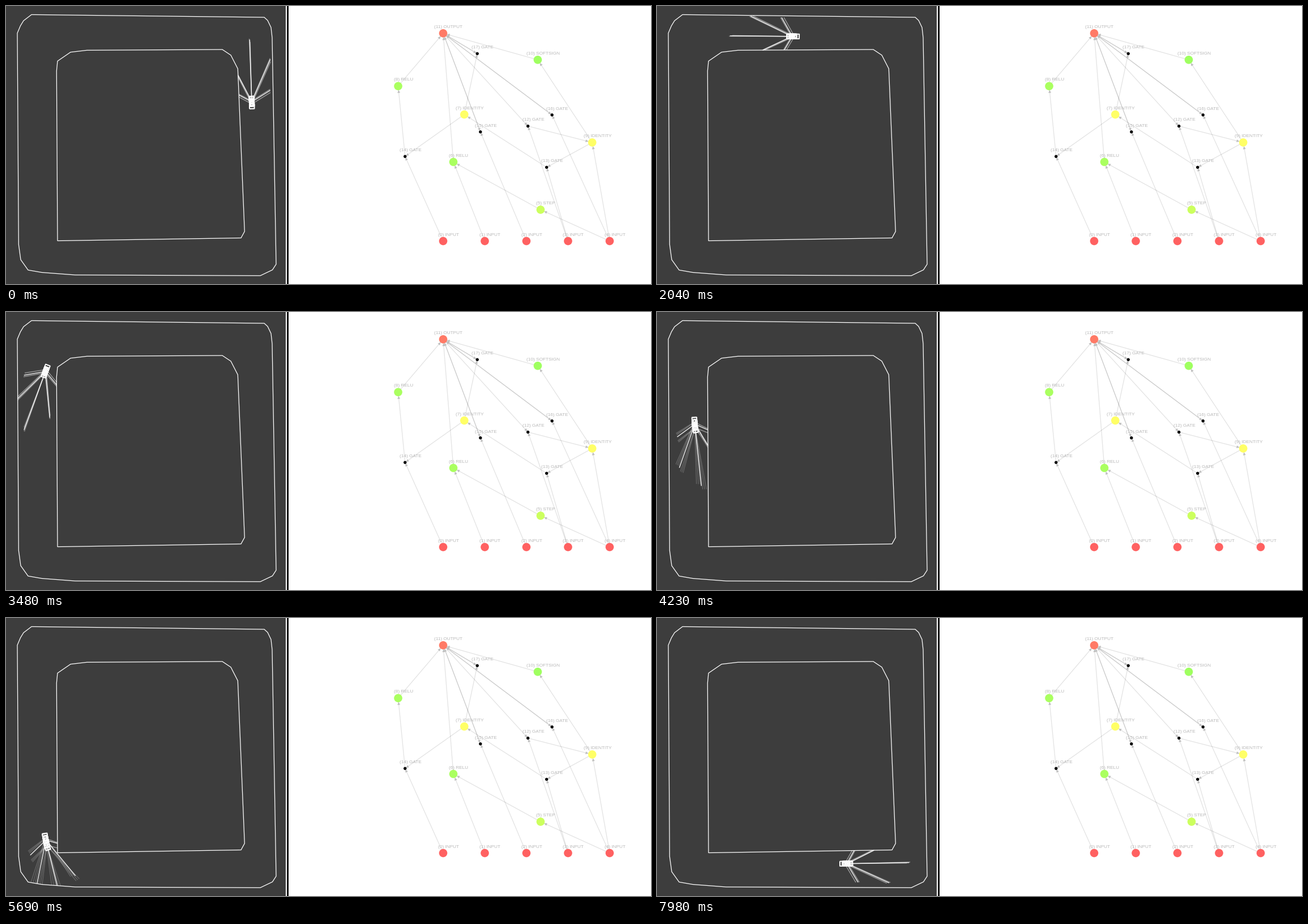
Animation, 1139 px wide and 492 px high, one loop 8 s. Source, as a matplotlib script:

```python
import numpy as np
import matplotlib.pyplot as plt
from matplotlib.animation import FuncAnimation
from matplotlib.collections import LineCollection
from matplotlib.patches import Circle, Polygon, Rectangle

W, H, DPI = 1139, 492, 64
PX = 72 / DPI            # points per pixel
STEP_MS, LOOP_MS = 40, 8000
SPEED = 0.132            # pixels per ms
FOLLOWERS = 6

fig = plt.figure(figsize=(W / DPI, H / DPI), dpi=DPI, facecolor="white")
ax = fig.add_axes([0, 0, 1, 1])
ax.set_xlim(0, W)
ax.set_ylim(H, 0)
ax.axis("off")


def unit(angle):
    return np.stack([np.cos(angle), np.sin(angle)], axis=-1)


# ---------- track ----------
OUTER = np.array([
    (45, 15.3), (456, 20), (462, 25.5), (468, 38), (470, 56), (477, 457),
    (470.5, 467), (449, 477.3), (122, 476), (63, 471.5), (39, 467.3),
    (26, 449), (22.3, 422), (20, 48), (25.5, 35), (31, 26)])
INNER = np.array([
    (143, 78.3), (382, 77), (397, 87), (409.3, 111), (421.3, 399),
    (415, 410.5), (91, 415.5), (89.3, 115), (91, 97.5), (114, 81.7)])

ax.add_patch(Rectangle((0, 0), 494, H, color="#3d3d3d", lw=0))
ax.add_patch(Rectangle((496, 0), 3, H, color="black", lw=0))
for wall in (OUTER, INNER):
    ax.add_patch(Polygon(wall, fill=False, ec="white", lw=1.25 * PX))

WALL_A = np.vstack([OUTER, INNER])
WALL_D = np.vstack([np.roll(p, -1, axis=0) - p for p in (OUTER, INNER)])

# ---------- network ----------
KINDS = {
    "INPUT": "#ff6161", "OUTPUT": "#ff7a66", "RELU": "#aaff60",
    "SOFTSIGN": "#9fff60", "IDENTITY": "#ffff66", "STEP": "#ccff5e",
    "GATE": "black"}
NODES = [("INPUT", 772 + 73.5 * i, 416) for i in range(5)] + [
    ("STEP", 944, 360.5), ("RELU", 790, 276), ("IDENTITY", 809.3, 192),
    ("RELU", 692.5, 141.8), ("IDENTITY", 1035.2, 241.5),
    ("SOFTSIGN", 939, 95.2), ("OUTPUT", 772, 48.3), ("GATE", 921.7, 212.6),
    ("GATE", 954.7, 285.5), ("GATE", 704.7, 266.3), ("GATE", 837.8, 222.8),
    ("GATE", 964.2, 192.8), ("GATE", 832.2, 84.3)]
CHAINS = [
    (0, 14, 8, 11), (4, 5, 6, 11), (1, 6), (2, 15, 11, 15), (3, 13),
    (3, 12, 9, 13, 7, 14), (7, 17, 11, 17), (4, 9, 10, 11, 12), (4, 16, 11, 16)]


def draw_edge(src, dst):
    a, b = (np.array(NODES[k][1:]) for k in (src, dst))
    u = (b - a) / np.hypot(*(b - a))
    n = np.array([-u[1], u[0]])
    tip = b - u * (1.5 if NODES[dst][0] == "GATE" else 6.5)
    base = tip - 5.5 * u
    ax.plot(*zip(a, base), color="black", alpha=0.11, lw=1.3 * PX, zorder=2)
    ax.add_patch(Polygon([tip, base + 2.4 * n, base - 2.4 * n],
                         color="#c0c0c0", lw=0, zorder=2.5))


for chain in CHAINS:
    for edge in zip(chain, chain[1:]):
        draw_edge(*edge)
for i, (kind, x, y) in enumerate(NODES):
    r = 2.7 if kind == "GATE" else 7.3
    ax.add_patch(Circle((x, y), r, color=KINDS[kind], lw=0, zorder=3))
    ax.text(x + 9.3, y - 9.3, f"({i}) {kind}", ha="center", va="baseline",
            family="Liberation Sans", size=8.2 * PX, color="#bababa", zorder=4)

# ---------- lead car: time, x, y, heading in degrees at key points ----------
KEYS = np.array([
    (0, 434, 171, -92), (820, 403, 67, -148), (1290, 339.5, 54, -182),
    (2730, 149.5, 57, -186), (3290, 82, 83, -232), (4230, 67, 201, -276),
    (5690, 70.5, 393, -284), (6660, 164, 453.5, -378),
    (7980, 336.5, 434.7, -361)], dtype=float)


def lead_pose(t):
    """Cubic path through the key points at an almost constant speed."""
    i = np.searchsorted(KEYS[1:-1, 0], t, side="right")
    (t0, *p0, a0), (t1, *p1, a1) = KEYS[i], KEYS[i + 1]
    p0, p1 = np.array(p0), np.array(p1)
    dt = t1 - t0
    s = (t - t0) / dt
    m0, m1 = (unit(np.radians(a)) * SPEED * dt for a in (a0, a1))
    pos = (p0 + (3 * s**2 - 2 * s**3) * (p1 - p0)
           + (s**3 - 2 * s**2 + s) * m0 + (s**3 - s**2) * m1)
    vel = (6 * (s - s**2) * (p1 - p0)
           + (3 * s**2 - 4 * s + 1) * m0 + (3 * s**2 - 2 * s) * m1)
    return pos, np.arctan2(vel[1], vel[0])


# Followers form two groups: one beside the lead car, one running ahead
ORDER = np.linspace(0, 1, FOLLOWERS)
PLACE = 0.8 * np.rint(ORDER) + 0.2 * ORDER


def pack(t):
    """Positions and headings of all cars, lead car first."""
    pos, head = lead_pose(t)
    spread = np.exp(-((t - 5600) / 1700) ** 4)
    swing = np.exp(-((t - 6500) / 500) ** 2)     # wide line out of the corner
    along = np.r_[0, -4 + (6 + 8 * spread) * PLACE]
    across = np.r_[0, 10 * swing * PLACE]
    turn = np.r_[0, (1 + 12 * spread) * (0.5 - ORDER) + 24 * swing * PLACE]
    ahead, right = unit(head), unit(head + np.pi / 2)
    centres = pos + along[:, None] * ahead + across[:, None] * right
    return centres, head + np.radians(turn)


RAY_ANGLES = np.radians([-60, -25.5, 0, 25.5, 60])
RAY_LENGTHS = np.array([38.5, 82, 110, 82, 38.5])


def cross(a, b):
    return a[..., 0] * b[..., 1] - a[..., 1] * b[..., 0]


def rays(centre, head):
    """Five sensor lines, cut where they meet a wall."""
    d = unit(head + RAY_ANGLES) * RAY_LENGTHS[:, None]
    gap = WALL_A - centre
    den = cross(d[:, None], WALL_D[None])
    den = np.where(np.abs(den) < 1e-9, 1e-9, den)
    along = cross(gap, WALL_D)[None] / den
    on_wall = cross(gap[None], d[:, None]) / den
    hit = (along > 0) & (on_wall >= 0) & (on_wall <= 1)
    cut = np.where(hit, along, 1).min(axis=1).clip(max=1)
    return [(centre, centre + v * c) for v, c in zip(d, cut)]


def box(x, y):
    return np.array([(-x, -y), (x, -y), (x, y), (-x, y), (-x, -y)])


CAR = [box(8.3, 4.3), box(4, 4.3), box(4, 2)]


def car_lines(centre, head):
    rot = np.array([unit(head), unit(head + np.pi / 2)])
    return [part @ rot + centre for part in CAR]


def lines(width, alpha, z):
    return ax.add_collection(LineCollection(
        [], colors="white", linewidths=width * PX, alpha=alpha, zorder=z), autolim=False)


ghost_rays = lines(1.1, 0.23, 5)
lead_rays = lines(1.5, 0.85, 6)
cars = lines(1.4, 0.95, 7)


def update(i):
    poses = list(zip(*pack(i * STEP_MS + 10)))
    ghost_rays.set_segments([r for pose in poses[1:] for r in rays(*pose)])
    lead_rays.set_segments(rays(*poses[0]))
    cars.set_segments([p for pose in poses for p in car_lines(*pose)])
    return ghost_rays, lead_rays, cars


anim = FuncAnimation(fig, update, frames=LOOP_MS // STEP_MS, interval=STEP_MS,
                     repeat=True, repeat_delay=0, blit=False)
plt.show()
```
